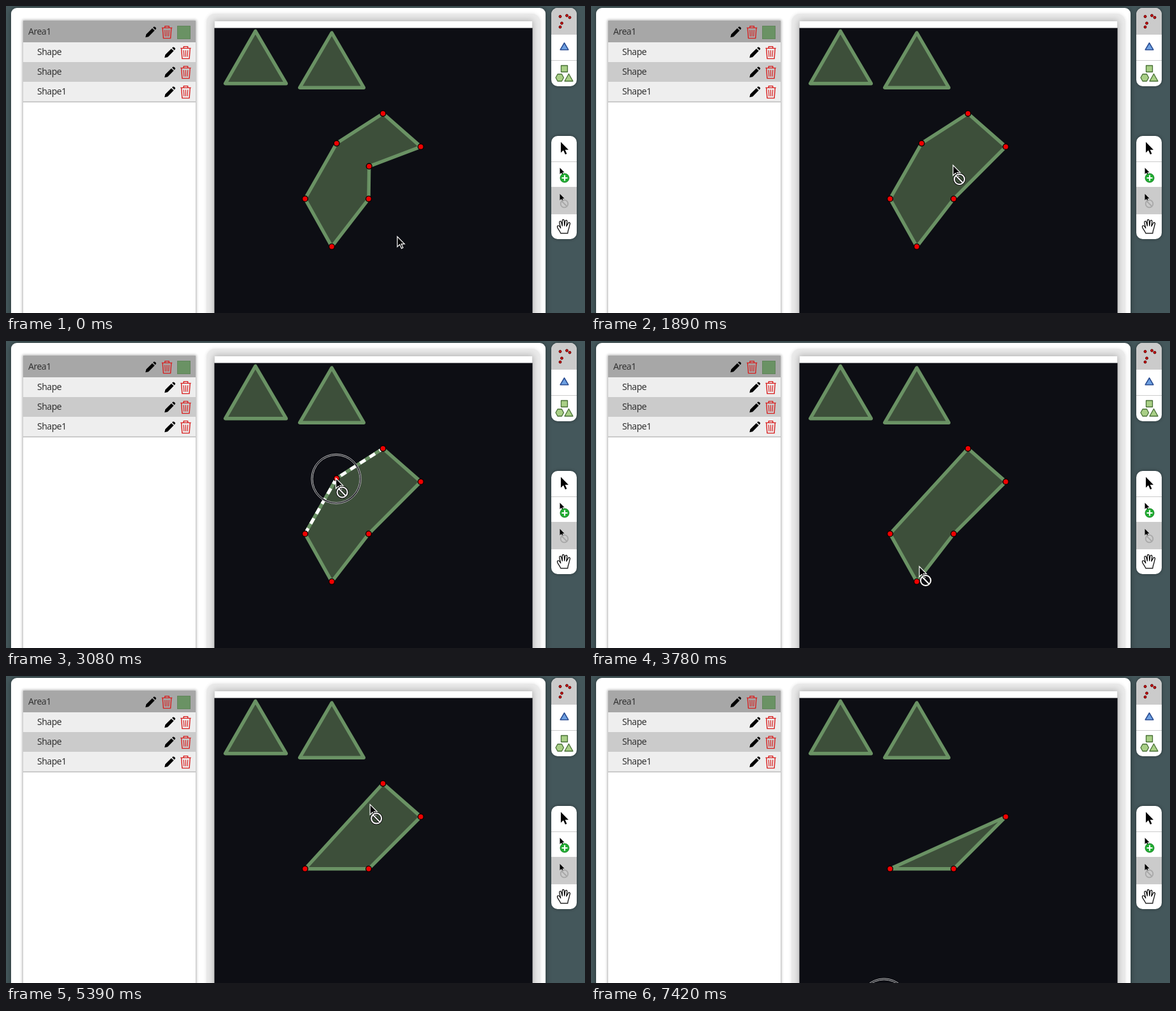
These frames come from a looping animation (910 px wide and 482 px high, 7.49 s). An HTML page:

```html
<!DOCTYPE html>
<html lang="en">
<head>
<meta charset="utf-8">
<title>Shape editor</title>
<style>
html, body { margin: 0; width: 100%; height: 100%; overflow: hidden; background: #44575b; }
div { position: absolute; box-sizing: border-box; }
#stage { left: 0; top: 0; width: 910px; height: 482px; overflow: hidden; }
.card { left: 7.5px; top: 3px; width: 840px; height: 520px; border-radius: 9px; background: #fff; box-shadow: 0 0 9px rgba(0, 0, 0, .4); }
.list { left: 27px; top: 23px; width: 271px; height: 500px; background: #fff; box-shadow: 0 0 4px 1px #aaa; }
.halo { left: 315px; top: 12px; width: 525px; height: 520px; border-radius: 14px; background: #ebebeb; box-shadow: 0 0 5px 1px #ebebeb; }
.board { left: 328px; top: 24px; width: 499px; height: 500px; background: #fff; box-shadow: 0 0 10px 2px #b4b4b4; }
.tools { left: 857px; width: 40px; border-radius: 10px; overflow: hidden; background: #fff; box-shadow: 0 0 5px rgba(0, 0, 0, .4); }
svg { position: absolute; left: 0; top: 0; }
text { font: 14px "Noto Sans", "Open Sans", sans-serif; letter-spacing: -.5px; fill: #333; }
</style>
</head>
<body>
<div id="stage">
  <div class="card"></div>
  <div class="list"></div>
  <div class="halo"></div>
  <div class="board"></div>
  <div class="tools" style="top:3px;height:123px"></div>
  <div class="tools" style="top:204px;height:162px"></div>
  <svg width="910" height="482" viewBox="0 0 910 482">
    <defs>
      <path id="arrow" d="M0 0V16L3.8 12.4L6.6 18.6L9 17.5L6.3 11.6H11.4Z"/>
      <path id="ban" d="M18 22A8 8 0 1 1 2 22A8 8 0 1 1 18 22M4.5 16.3L15.5 27.7"/>
      <path id="pencil" d="M-8.3 8.3L-7.2 3.5L2.4 -6.1L6.1 -2.4L-3.5 7.2ZM3.5 -7.2L5 -8.4Q6 -9 7 -8L8 -7Q9 -6 8.3 -5L7.2 -3.5Z"/>
      <g id="bin" fill="none" stroke="#d81e1e" stroke-width="1.4" stroke-linejoin="round">
        <path d="M-8.2 -6.6H8.2M-3.2 -6.8V-9.4H3.2V-6.8M-6.8 -6.4L-5.6 9.6H5.6L6.8 -6.4"/>
        <path d="M-3.2 -3.5L-2.6 6.8M0 -3.5V6.8M3.2 -3.5L2.6 6.8" stroke-width="1.2"/>
      </g>
    </defs>
    <g id="rows"></g>
    <rect x="327.5" y="34.5" width="500" height="460" fill="#0d0e14"/>
    <g fill="#3d4f3a" stroke="#6a9264" stroke-width="5.4" stroke-linejoin="round">
      <path d="M392 39.3L344.7 121.7H440.3Z"/>
      <path d="M512 42L461.7 128.2H562.3Z"/>
      <polygon id="area"/>
    </g>
    <polyline id="dashes" fill="none" stroke="#fff" stroke-width="5" stroke-dasharray="10 8"/>
    <g id="dots" fill="#f00000" stroke="#100" stroke-width="1.4"></g>
    <g id="pointer">
      <use href="#arrow" fill="#000" stroke="#fff" stroke-width="1.2"/>
      <g id="sign" fill="none">
        <use href="#ban" stroke="#111" stroke-width="4"/>
        <use href="#ban" stroke="#fff" stroke-width="2"/>
      </g>
    </g>
    <g id="ring" fill="none" stroke="#d4d4d4" stroke-width=".9">
      <circle r="38" stroke="#0d0e14" stroke-width="3"/>
      <circle r="39.2"/>
      <circle r="37"/>
    </g>

    <path d="M857 44V13A10 10 0 0 1 867 3H887A10 10 0 0 1 897 13V44ZM857 285H897V326H857Z" fill="#cbcbcb"/>
    <path d="M857 44.5H897M857 85.5H897M857 244.5H897M857 284.5H897M857 326.5H897" stroke="#ccc"/>
    <g id="specks" fill="#d00000" stroke="#500" stroke-width=".9"></g>
    <path d="M877.5 58L883.8 68.7H871.2Z" fill="#6d9fe0" stroke="#2a4d92" stroke-width="1.6" stroke-linejoin="round"/>
    <g fill="#a9cf86" stroke="#476f35" stroke-width="1.3" stroke-linejoin="round">
      <path d="M872.5 93.5H882.5V103.5H872.5Z"/>
      <path d="M864 112.5L867 107H873.5L876.5 112.5L873.5 118H867Z"/>
      <path d="M884.5 106.5L891 118H878Z"/>
    </g>
    <use href="#arrow" transform="translate(872 213.5) scale(1.05)"/>
    <use href="#arrow" transform="translate(870.5 254) scale(.62)"/>
    <use href="#arrow" transform="translate(870.5 295) scale(.62)"/>
    <circle cx="878" cy="270" r="7" fill="#21ad32" stroke="#178525"/>
    <path d="M873.5 270H882.5M878 265.5V274.5" stroke="#fff" stroke-width="2.2"/>
    <g fill="none" stroke="#a8a8a8" stroke-width="1.8">
      <circle cx="877.5" cy="310.5" r="5.8"/>
      <path d="M873.5 306.5L881.5 314.5"/>
    </g>
    <path transform="translate(876.8 346.3)" fill="#fff" stroke="#000" stroke-width="1.2" stroke-linejoin="round"
      d="M-5 10.5C-6 7 -9 4.5 -10.3 1C-11 -1.5 -8 -2.5 -6.8 -.3L-5 2.5L-7 -6C-7.4 -8.8 -4.6 -9.2 -4 -6.8L-2.5 -1L-2.5 -9.2C-2.4 -11.4 .4 -11.4 .5 -9.2L.8 -1.2L2.2 -8.8C2.8 -10.8 5.4 -10.2 5.1 -7.9L4 -.4L6.8 -5.3C8 -7.3 10.3 -6 9.6 -4C8.6 -1 8 3 7 5.5C6.3 7.5 6.3 8.5 6 10.5Z"/>
  </svg>
</div>
<script>
const LOOP = 7490, STEP = 70;
const $ = id => document.getElementById(id);
const circles = (pts, r) => pts.map(([x, y]) => `<circle cx="${x}" cy="${y}" r="${r}"/>`).join("");

const icon = (id, x, y) => `<use href="#${id}" x="${x}" y="${y}"/>`;
const row = (label, x, y, h, fill, pencilX, binX) =>
  `<rect x="27" y="${y}" width="271" height="${h}" fill="${fill}"/>` +
  `<text x="${x}" y="${y + 19.5}">${label}</text>` +
  icon("pencil", pencilX, y + 16) + icon("bin", binX, y + 16);

$("rows").innerHTML =
  row("Area1", 35, 25, 32, "#a7a7a7", 227.5, 253) +
  `<rect x="27" y="23" width="271" height="2" fill="#a7a7a7"/>` +
  `<rect x="269.5" y="31.5" width="20" height="20" fill="#6a9264" stroke="#5f8559"/>` +
  ["Shape", "Shape", "Shape1"].map((name, i) =>
    row(name, 49, 57 + 31 * i, 31, i % 2 ? "#cbcbcb" : "#eeeeee", 257.5, 282.5)).join("") +
  `<path d="M27 150.5H298" stroke="#bbb" stroke-width="1.5"/>`;

$("specks").innerHTML = circles([[871, 16.5], [881.5, 15], [886, 18], [873.5, 27], [871, 33]], 2);

// Each corner: place, hover start, click, removal
const corners = [
  { p: [470, 302.7] },
  { p: [519.6, 215.6], hover: 2660, click: 3080, gone: 3220 },
  { p: [592.5, 168.8], hover: 5740, click: 6160, gone: 6300 },
  { p: [651.9, 220.9] },
  { p: [570.7, 251.7], hover: 1050, click: 1750, gone: 1890 },
  { p: [570, 302.8] },
  { p: [512, 377.8], hover: 4060, click: 4830, gone: 4970 }
];
const clicks = corners.map(c => c.click).concat(7420);

// Pointer stops: time, x, y
const stops = [
  [0, 615, 362], [70, 614, 356], [140, 614, 356], [770, 585, 260], [910, 577, 255],
  [1260, 569, 250], [2100, 569, 250], [2800, 518.5, 215.5], [3220, 518.5, 215.5],
  [3780, 516, 354], [4200, 511, 386], [4550, 512, 376], [4620, 512, 374],
  [5040, 512, 374], [5530, 587, 159], [5600, 587, 159], [6090, 594.5, 168.5],
  [6510, 594.5, 168.5], [7070, 468, 490], [7140, 460, 513], [7490, 460, 513]
];

const slope = (i, k) => (stops[i + 1][k] - stops[i][k]) / (stops[i + 1][0] - stops[i][0]);

// Harmonic mean keeps the curve free of overshoot
function tangent(i, k) {
  if (i === 0 || i === stops.length - 1) return 0;
  const a = slope(i - 1, k), b = slope(i, k);
  return a * b > 0 ? 2 * a * b / (a + b) : 0;
}

function pointerAt(t, k) {
  let i = 0;
  while (i < stops.length - 2 && t >= stops[i + 1][0]) i++;
  const a = stops[i], b = stops[i + 1], d = b[0] - a[0], u = (t - a[0]) / d;
  const s = u * u * (3 - 2 * u);
  return a[k] + (b[k] - a[k]) * s +
    d * u * (1 - u) * ((1 - u) * tangent(i, k) - u * tangent(i + 1, k));
}

function draw(t) {
  const live = corners.filter(c => !(t >= c.gone));
  const points = live.map(c => c.p);
  const n = live.length;
  const h = live.findIndex(c => t >= c.hover);
  $("area").setAttribute("points", points.join(" "));
  $("dots").innerHTML = circles(points, 4.4);

  let edge = "";
  if (h >= 0) {
    const ends = [points[(h + n - 1) % n], points[(h + 1) % n]].sort((a, b) => a[0] - b[0]);
    edge = [ends[0], points[h], ends[1]].join(" ");
  }
  $("dashes").setAttribute("points", edge);

  const place = `translate(${pointerAt(t, 1)} ${pointerAt(t, 2)})`;
  $("pointer").setAttribute("transform", place);
  $("sign").style.display = t < 70 ? "none" : "";
  $("ring").setAttribute("transform", place + " translate(.5 1)");
  $("ring").style.display = clicks.some(c => t >= c && t < c + STEP) ? "" : "none";
}

const start = performance.now();
function tick() {
  const t = (performance.now() - start) % LOOP;
  draw(Math.floor(t / STEP) * STEP);
  requestAnimationFrame(tick);
}
tick();
</script>
</body>
</html>
```
